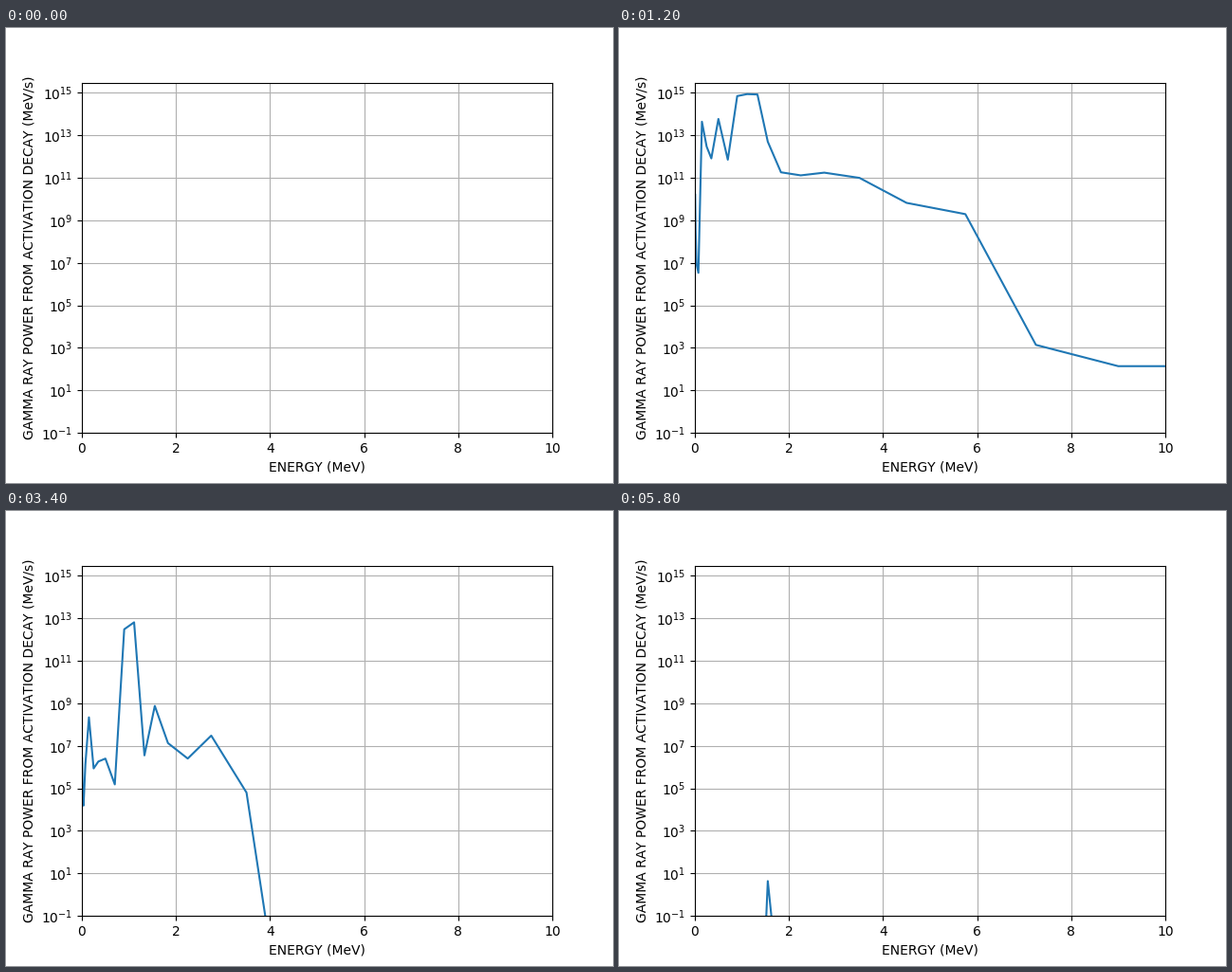
A matplotlib script that plays this animation: 640 by 480 pixels, repeating every 6000 ms.

```python
import numpy as np
import matplotlib.pyplot as plt
from matplotlib.animation import FuncAnimation
from matplotlib.ticker import NullLocator

FRAMES = 30
# background, grid, curve
NORMAL = ("white", "#b0b0b0", "#1f77b4")
GREY = ("#868686", "#4e4e4e", "#111111")

# whole-pixel kerning for the labels
plt.rcParams["text.kerning_factor"] = 6

# gamma group edges in MeV; spectra are plotted at group centres
edges = np.r_[0, .01, .02, .05, .1:.4:4j, .6:1:3j, 1.22:1.66:3j,
              2:3:3j, 4, 5, 6.5, 8:12:3j]
energy = (edges[1:] + edges[:-1]) / 2


def bump(centre, height, width, power=2):
    return height * np.exp(-np.abs((energy - centre) / width) ** power)


def through(*points):
    """Straight lines through (energy, value) points."""
    return np.interp(energy, *zip(*points))


# log10 power at shutdown: flat continuum, three peaks, falling high end
start = (through((0, 11.7), (3.5, 11.5), (4.5, 9.9), (5.75, 9.4),
                 (7.25, 5), (9, 4))
         + bump(.17, 2.07, .081) + bump(.5, 2.1, .1)
         + bump(1.16, 3.3, .4, 8))
start = np.where(energy < .1, 6 + 5.4 * np.exp(-energy / .02), start)

# short-lived part: decades lost by step 14, and how sharply they go
loss = through((.035, .8), (.25, 1.4), (.35, 3.6), (.5, 2.3), (.7, 2.5),
               (.9, .5), (1.11, .45), (1.55, 3.1), (1.83, 2.8), (2.25, 3.8),
               (2.75, 2.5), (3.5, 4.2), (5, 17), (5.75, 17.6), (7.25, 300))
sharp = np.select([energy < 1.44, energy < 4], [8, 2.5], 6)

# long-lived part: log10 power at step 21; weaker groups fade faster
tail = (through((0, 5.7), (2.25, 5.6), (2.75, 3.4), (3.5, 1.7), (4.5, -14),
                (5.75, -99))
        + bump(.015, -6, .03) + bump(.21, -6.3, .075) + bump(.7, -1.5, .1)
        + bump(1.33, -1.4, .1) + bump(1.55, 2.68, .1))
fade = 5.2 / np.maximum(tail, 1)


def spectrum(n):
    short = start - loss * (n / 14) ** sharp
    long = tail + fade * (1 - (n / 21) ** 8)
    power = 10.0 ** short + 10.0 ** long
    return np.where(power < 1e-18, 0, power)


fig, ax = plt.subplots(figsize=(6.4, 4.8), dpi=100)
ax.set_yscale("log")
ax.set_xlim(0, 10)
ax.set_ylim(1e-1, 3e15)
ax.set_yticks(10.0 ** np.arange(-1, 16, 2))
ax.yaxis.set_minor_locator(NullLocator())
ax.set_xlabel("ENERGY (MeV)")
ax.set_ylabel("GAMMA RAY POWER FROM ACTIVATION DECAY (MeV/s)")
ax.grid(True)
curve, = ax.plot([], [], lw=1.5)


def draw(n):
    back, grid, ink = GREY if n == 1 else NORMAL
    fig.set_facecolor(back)
    ax.set_facecolor(back)
    for line in ax.get_xgridlines() + ax.get_ygridlines():
        line.set_color(grid)
    curve.set_color(ink)
    curve.set_data(*((energy, spectrum(n)) if n else ([], [])))
    return curve,


anim = FuncAnimation(fig, draw, frames=FRAMES, interval=200, repeat=True,
                     repeat_delay=0)
plt.show()
```
